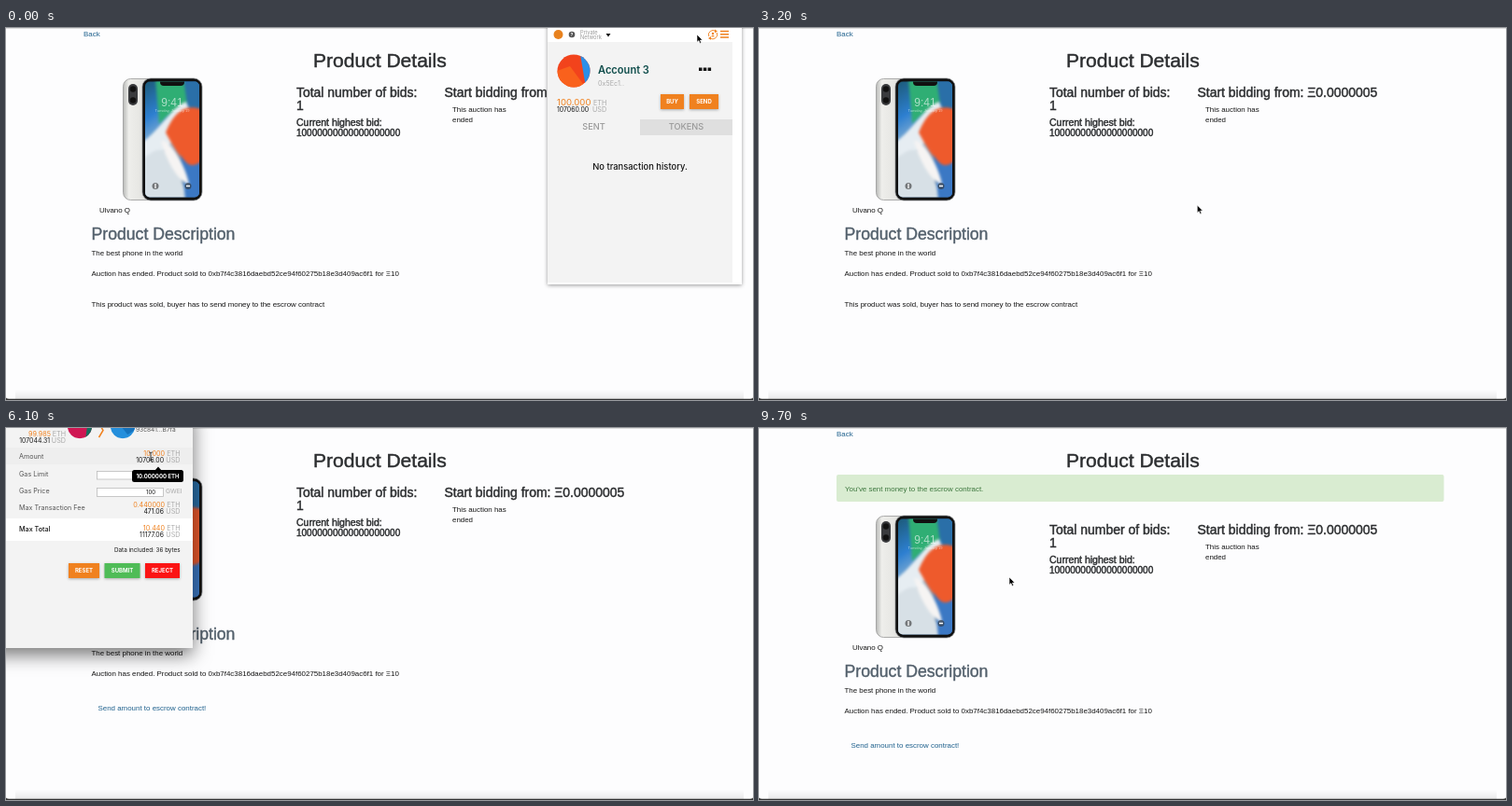
Recreate the animation shown at these times as an HTML page. Size 800 px wide and 399 px high, loop 9.8 s.

```html
<!DOCTYPE html>
<html lang="en">
<head>
<meta charset="utf-8">
<title>Product Details</title>
<style>
html, body { margin: 0; width: 100%; height: 100%; overflow: hidden; background: #fdfdfe; }
svg { display: block; font: 7.93px "Liberation Sans", Arial, sans-serif; fill: #151515; }
.h { fill: #2c2e30; stroke: #2c2e30; stroke-width: .45; }
.link { fill: #1f618d; }
.wallet { font-family: Inter, sans-serif; font-size: 7.2px; }
.o { fill: #f0811f; }
.g { fill: #aaa; }
.d { fill: #555; }
.mid { text-anchor: middle; }
.end { text-anchor: end; }
.btn { fill: #fff; font-size: 6px; font-weight: 700; text-anchor: middle; }
.name { font-size: 11.1px; font-weight: 600; fill: #0f4d4b; }
.panel { filter: drop-shadow(0 7px 10px rgba(0, 0, 0, .55)); }
.menu { filter: drop-shadow(0 1px 2px rgba(0, 0, 0, .4)); }
.lift { filter: drop-shadow(0 1px 1.5px rgba(0, 0, 0, .3)); }
.soft { filter: blur(1.5px); }
</style>
</head>
<body>
<svg width="800" height="399" viewBox="0 0 800 399">
<defs>
  <linearGradient id="dock" x2="0" y2="1"><stop stop-color="#fdfdfe"/><stop offset="1" stop-color="#e9e9ea"/></linearGradient>
  <linearGradient id="silver"><stop stop-color="#b9bab8"/><stop offset=".15" stop-color="#eeeeeb"/><stop offset="1" stop-color="#d9d9d5"/></linearGradient>
  <linearGradient id="sky" x2=".3" y2="1"><stop stop-color="#1c5a78"/><stop offset=".3" stop-color="#2d7fd0"/><stop offset=".6" stop-color="#a9c3d4"/><stop offset="1" stop-color="#315f8f"/></linearGradient>
  <clipPath id="screen"><rect x="149" y="57.500" width="58" height="124" rx="5"/></clipPath>
  <clipPath id="round"><circle r="17.500"/></clipPath>
  <clipPath id="confirmArea"><rect width="200" height="236"/></clipPath>
  <g id="avatarRed" clip-path="url(#round)">
    <path d="M-18-18H18V18H-18z" fill="#f2431c"/><path d="M7-18 18-12V18H13z" fill="#2b8fe8"/><path d="M-18 0-4-5 13 18H-18z" fill="#f9611c"/>
  </g>
  <g id="avatarPink" clip-path="url(#round)">
    <path d="M-18-18H18V18H-18z" fill="#cf1753"/><path d="M-18-18H18V2L6-9-14-6z" fill="#f3b41b"/><path d="M-18-12 8-13 14 15-9 14z" fill="#cf1753"/><path d="M12-8 18-6V18H8z" fill="#17705f"/>
  </g>
  <g id="avatarBlue" clip-path="url(#round)">
    <path d="M-18-18H18V18H-18z" fill="#258fdc"/><path d="M-18-18H12L-6-3-18 2z" fill="#f5761c"/><path d="M-1 2 18-12V5L7 12z" fill="#1673bd"/>
  </g>
</defs>

<rect width="800" height="399" fill="#fdfdfe"/>
<rect width="800" height="1" fill="#ddd"/>
<rect x="10" y="388" width="780" height="10" fill="url(#dock)"/>
<path d="M0 396q0 1.700 3 1.700H797q3 0 3-1.700V399H0z" fill="#333"/>

<text class="link" x="83" y="9">Back</text>
<text class="h" x="329" y="41.500" font-size="21.050">Product Details</text>
<g id="notice">
  <rect x="83" y="50" width="650.500" height="29" rx="2" fill="#d9ecd1"/>
  <text x="92" y="67.500" fill="#3c763d">You've sent money to the escrow contract.</text>
</g>

<g id="details">
  <rect x="125.500" y="54.500" width="40" height="130" rx="8" fill="url(#silver)" stroke="#999" stroke-width=".8"/>
  <rect x="131" y="60" width="10" height="23" rx="5" fill="#3a3b3e"/>
  <circle cx="136" cy="65.500" r="3.200" fill="#111"/><circle cx="136" cy="77.500" r="3.200" fill="#111"/>
  <rect x="146" y="54" width="64" height="131" rx="9" fill="#111" stroke="#85878a" stroke-width=".7"/>
  <g clip-path="url(#screen)">
    <path d="M149 57h58v125h-58z" fill="url(#sky)"/>
    <g class="soft">
      <path d="M160 54H210V84C190 76 175 92 164 103z" fill="#2fae74"/>
      <path d="M190 54H210V100L194 82z" fill="#2a6fa8"/>
      <path d="M147 122C166 108 178 84 193 79L200 100 178 122 147 150z" fill="#e6edf2"/>
      <path d="M147 140C162 128 172 124 183 150L196 184H147z" fill="#d7e0e6"/>
      <path d="M171 112C178 95 189 80 209 87V146C199 158 184 137 171 112z" fill="#ee5a2c"/>
      <path d="M187 136C196 152 203 148 210 142V184H192z" fill="#3b78c4"/>
      <path d="M166 121C176 119 193 149 196 168 184 164 172 143 166 121z" fill="#f6f4f3"/>
    </g>
    <path d="M165 57h26v1q0 4-4 4h-18q-4 0-4-4z" fill="#111"/>
    <text class="mid" x="178" y="84" font-size="12" fill="#fff" fill-opacity=".6">9:41</text>
    <text class="mid" x="178" y="90" font-size="4" fill="#fff" fill-opacity=".6">Tuesday, January 19</text>
    <circle cx="160" cy="169.500" r="3.500" fill="#333" fill-opacity=".6"/><circle cx="195" cy="169.500" r="3.500" fill="#333" fill-opacity=".6"/>
    <path d="M160 167v5M193 169.500h4" stroke="#fff" stroke-width="1.300"/>
  </g>
  <text x="100" y="197.500">Ulvano Q</text>
  <g class="h" font-size="13.950">
    <text x="311" y="74">Total number of bids:</text><text x="311" y="88">1</text>
    <text x="469.500" y="74">Start bidding from: Ξ0.0000005</text>
  </g>
  <text class="h" x="311" y="104.700" font-size="10.500">Current highest bid:</text>
  <text class="h" x="311" y="115.500" font-size="10">10000000000000000000</text>
  <text x="478" y="90">This auction has</text><text x="478" y="101">ended</text>
  <text x="91.500" y="227" font-size="17.650" fill="#53606c" stroke="#53606c" stroke-width=".4">Product Description</text>
  <text x="91.500" y="243.500">The best phone in the world</text>
  <text x="91.500" y="266">Auction has ended. Product sold to 0xb7f4c3816daebd52ce94f60275b18e3d409ac6f1 for Ξ10</text>
  <text id="sold" x="91.500" y="299">This product was sold, buyer has to send money to the escrow contract</text>
  <text id="pay" x="98.500" y="303">Send amount to escrow contract!</text>
</g>

<g id="account" class="wallet">
  <rect class="menu" x="580" y="-20" width="208" height="295" fill="#fff"/>
  <path d="M580 15H778V273H580z" fill="#f3f3f3"/>
  <path d="M679 98H778V115H679z" fill="#dfdfdf"/>
  <circle cx="591.500" cy="7" r="5" fill="#e8821e"/>
  <circle cx="606" cy="7" r="3.300" fill="#555"/><text class="mid" x="606" y="9" font-size="5" font-weight="700" fill="#fff">?</text>
  <g font-size="5.700" fill="#999"><text x="615" y="6.500">Private</text><text x="615" y="11.500">Network</text></g>
  <path d="M642.500 6h5l-2.500 3.500z"/>
  <g fill="none" stroke="#f0811f"><path d="M752.700 9A4.800 4.800 0 0 1 760 3.400M761.300 5A4.800 4.800 0 0 1 754 10.800" stroke-width=".9"/><path d="M765 3.500h9m-9 3.300h9m-9 3.300h9" stroke-width="1.500"/></g>
  <g class="o"><circle cx="757" cy="6" r="1.200"/><path d="M755 9.300q2-3.200 4 0zM759 1.500l3 2-3 1.700zM755 9l-3 2 3 1.700z"/></g>
  <path d="M742 42.500h3.500v3.500H742zM746.800 42.500h3.500v3.500h-3.500zM751.600 42.500h3.500v3.500h-3.500z"/>
  <g class="lift o"><path d="M701 71h25v16h-25zM732 71h31v16h-31z"/></g>
  <g class="btn"><text x="713.500" y="81.200">BUY</text><text x="747.500" y="81.200">SEND</text></g>
  <g class="mid" font-size="9.200" font-weight="500" fill="#999"><text x="629.500" y="109.300">SENT</text><text x="728.500" y="109.300">TOKENS</text></g>
  <g id="third">
    <use href="#avatarRed" x="608" y="46"/>
    <text class="name" x="634" y="48.500">Account 3</text>
    <text class="g" x="634" y="62">0x5Ec1..</text>
    <text class="o" x="590" y="82.800" font-size="9.600">100.000</text><text class="g" x="629" y="82.500">ETH</text>
    <text x="590" y="89.500" font-size="6.900">107060.00</text><text class="g" x="628" y="89.500">USD</text>
    <text class="mid" x="679" y="151.500" font-size="9.400" font-weight="500">No transaction history.</text>
  </g>
  <g id="second">
    <use href="#avatarPink" x="608" y="46"/>
    <text class="name" x="634" y="48.500">Account 2</text>
    <text class="g" x="634" y="62">0xb7f4C...</text>
    <text class="o" x="594" y="82.800" font-size="8.600">99.985</text><text class="g" x="625" y="82.500">ETH</text>
    <text x="590" y="89.500" font-size="6.500">107044.31</text><text class="g" x="624" y="89.500">USD</text>
    <path class="o" d="M597.500 131.500l6.300 11.500H591.200z"/><path d="M597.500 135.500v4m0 1v1.200" stroke="#fff" stroke-width="1.200"/>
    <g class="mid" font-size="8.900" font-weight="500"><text x="669" y="134.700">January 19 2018 13:17</text><text x="672" y="181.500">January 19 2018 13:16</text></g>
    <g class="mid" font-size="5.800" fill="#888"><text x="677" y="145.500">0x93c841de...B7fa <tspan class="o" font-weight="600">(Rejected)</tspan></text><text x="672" y="193">0x93c841de...B7fa</text></g>
    <text class="o" x="736" y="141">10.0</text><text class="g end" x="769" y="141">ETH</text>
    <path d="M590 161H767" stroke="#ddd"/>
    <use href="#avatarBlue" transform="translate(598 185) scale(.4)"/>
    <text x="610" y="188" font-size="8.600">0</text>
    <path class="o" d="M725 181h5v2h-3v6h-2zM728 184h6v6h-6z"/>
    <text class="o" x="745" y="188" font-size="8.600">0</text><text class="g end" x="767.500" y="188">ETH</text>
  </g>
</g>

<g id="confirm" class="wallet">
  <rect class="panel" x="-20" y="-20" width="220" height="256" fill="#fff"/>
  <g id="form" clip-path="url(#confirmArea)">
    <path d="M0 0H200V236H0z" fill="#f3f3f3"/><path d="M0 21H200V39H0z" fill="#eee"/><path d="M0 97H200V121H0z" fill="#fff"/>
    <text class="o end" x="48" y="8.800">99.985</text><text class="g end" x="64" y="8.800">ETH</text>
    <text class="end" x="47" y="15.600" font-size="6.900">107044.31</text><text class="g end" x="64" y="15.600">USD</text>
    <use href="#avatarPink" transform="translate(79 -2) scale(.75)"/><use href="#avatarBlue" transform="translate(125 -2) scale(.75)"/>
    <path d="M99.500-5l4.500 7.500-4.500 7.500" fill="none" stroke="#f0811f" stroke-width="1.500"/>
    <g class="d"><text x="139" y="4" font-size="6.600">93c841...B7fa</text>
      <text x="14" y="32.500">Amount</text><text x="14" y="52.300">Gas Limit</text><text x="14" y="70.300">Gas Price</text><text x="14" y="88.300">Max Transaction Fee</text></g>
    <text x="14" y="110.800" font-weight="500">Max Total</text>
    <g fill="#fff" stroke="#bbb" stroke-width=".8"><rect x="97.500" y="46.500" width="71" height="8.500"/><rect x="97.500" y="64.500" width="71" height="9"/></g>
    <text class="mid" x="155" y="71.300" font-size="6">100</text><text class="g" x="171" y="70.300" font-size="6.800">GWEI</text>
    <g id="sums" class="end"></g>
    <text class="end" x="186.500" y="133" font-size="6.300">Data included: 36 bytes</text>
    <g class="lift"><path d="M67 145h33v16H67z" class="o"/><path d="M105.500 145h38v16h-38z" fill="#4fbc57"/><path d="M149 145h37v16h-37z" fill="#fb1414"/></g>
    <g class="btn"><text x="83.500" y="155.200">RESET</text><text x="124.500" y="155.200">SUBMIT</text><text x="167.500" y="155.200">REJECT</text></g>
    <g id="tip"><path d="M159.500 45.500l3.500-4 3.500 4z" fill="#000"/><rect x="135" y="45" width="55" height="13" rx="2.500" fill="#000"/><text class="btn" x="162.500" y="53.600">10.000000 ETH</text></g>
  </g>
</g>

<g id="cursor">
  <path id="arrow" d="M0 0V8.200L1.900 6.500 3.200 9.400 4.600 8.800 3.400 6H6z" fill="#000" stroke="#fff" stroke-width=".6"/>
  <path id="hand" d="M-1 5.500V.8q1-1.300 2 0V3.500Q4.500 3.200 4.800 5V7.500L4 9.500H0L-2.800 6q0-1.200 1.800-.5z" fill="#fff" stroke="#000" stroke-width=".9"/>
  <path id="beam" d="M-1.800-4Q0-4 0-3 0-4 1.800-4M0-3V4M-1.800 5Q0 5 0 4 0 5 1.800 5" fill="none" stroke="#222" stroke-width=".9"/>
</g>
</svg>
<script>
const LOOP = 9800;
const path = [
  [0, 740, 7], [300, 740, 7], [1000, 757, 9], [1700, 757, 9], [2250, 484, 185], [3100, 484, 185],
  [3900, 148.5, 301], [4700, 148.5, 301], [5400, 155, 30], [6300, 155, 30], [6900, 125, 152],
  [7400, 125, 152], [8000, 267, 159], [9000, 267, 159], [9200, 268, 160], [LOOP, 268, 160]
];
const $ = id => document.getElementById(id);
const show = (id, on) => $(id).style.display = on ? "" : "none";

const sum = (y, eth, usd) => `
  <text class="o" x="170" y="${y}">${eth}</text><text class="g" x="186.5" y="${y}">ETH</text>
  <text x="169" y="${y + 7}" font-size="6.900">${usd}</text><text class="g" x="186.5" y="${y + 7}">USD</text>`;
$("sums").innerHTML = sum(29.8, "10.000", "10706.00") + sum(85, "0.440000", "471.06") + sum(110, "10.440", "11177.06");

function cursorAt(t) {
  const i = path.findIndex(p => p[0] > t);
  const [t0, x0, y0] = path[i - 1], [t1, x1, y1] = path[i];
  const u = (t - t0) / (t1 - t0), k = u * u * (3 - 2 * u);
  return [x0 + (x1 - x0) * k, y0 + (y1 - y0) * k];
}

function draw() {
  const t = performance.now() % LOOP;
  const within = (a, b) => t >= a && t < b;
  const paid = t >= 7800, payable = t >= 3300;
  show("account", t < 2600);
  show("third", t < 1700);
  show("second", t >= 1700);
  show("sold", !payable);
  show("pay", payable);
  $("pay").setAttribute("class", within(3850, 4800) ? "" : "link");
  show("confirm", within(4150, 7400));
  show("form", t >= 4600);
  show("tip", within(5400, 6450));
  show("notice", paid);
  $("details").setAttribute("transform", `translate(0 ${paid ? 40 : 0})`);
  const hand = within(900, 1750) || within(6800, 7400), beam = within(5300, 6400);
  show("hand", hand);
  show("beam", beam);
  show("arrow", !hand && !beam);
  $("cursor").setAttribute("transform", `translate(${cursorAt(t)})`);
  requestAnimationFrame(draw);
}
draw();
</script>
</body>
</html>
```
